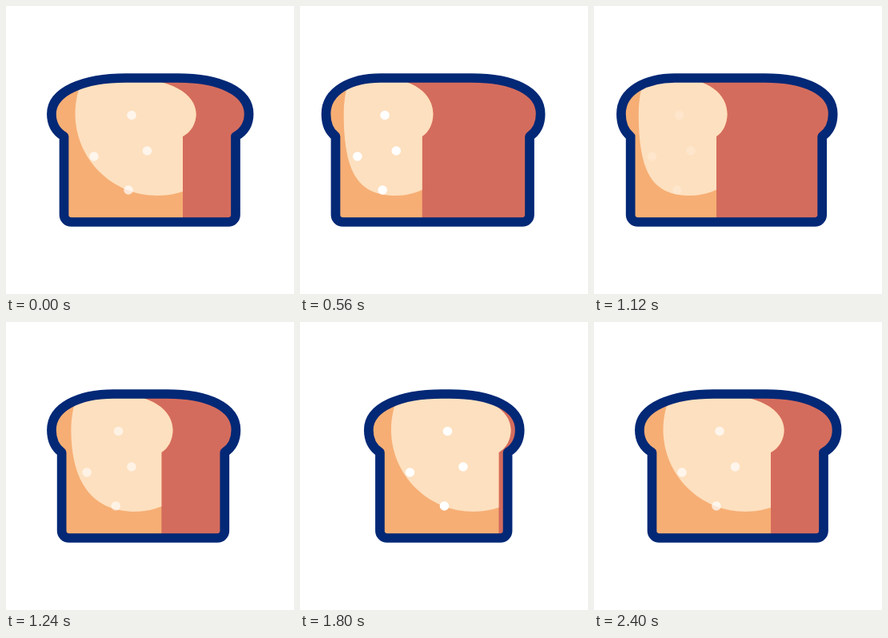
These frames come from a looping animation (360 px wide and 360 px high, 2.6 s). An HTML page:

```html
<!DOCTYPE html>
<html lang="en">
<head>
<meta charset="utf-8">
<title>Bread loaf</title>
<style>
  html, body { margin: 0; width: 100%; height: 100%; overflow: hidden; background: #fff; }
  svg { display: block; width: 100%; height: 100%; }
</style>
</head>
<body>
<svg viewBox="0 0 360 360">
  <defs>
    <clipPath id="loafClip"><path class="loaf"/></clipPath>
    <clipPath id="faceClip"><path class="face"/></clipPath>
  </defs>
  <path class="loaf" fill="#d46c5d"/>
  <g clip-path="url(#loafClip)">
    <path class="face" fill="#f6ae74"/>
    <g clip-path="url(#faceClip)"><path id="glow" fill="#fde0bf"/></g>
  </g>
  <g id="dots" fill="#fff"></g>
  <path class="loaf" fill="none" stroke="#022876" stroke-width="11.7" stroke-linejoin="round"/>
</svg>
<script>
const LOOP = 2600, STEP = 40, SLICE_LEFT = 102.5;

// left, right: body edges; lobeL, lobeR: overhang of the top crust;
// squash: horizontal scale of the front face; lowest, bulge: shape of the light area
const angled = { left: 72.5, right: 287, lobeL: 15.6, lobeR: 16.6, squash: 1, lowest: 219, bulge: 0.552 };
const side = { left: 42, right: 287, lobeL: 11.6, lobeR: 13.4, squash: 0.705, lowest: 205, bulge: 0.74 };
const front = { left: 102.5, right: 257, lobeL: 14, lobeR: 15, squash: 1, lowest: 219, bulge: 0.552 };

const moves = [
  { start: 160, end: 710, from: angled, to: side },
  { start: 995, end: 1500, from: side, to: front },
  { start: 1600, end: 2320, from: front, to: angled }
];
const dotFade = [
  [0, 0.7], [240, 0.7], [360, 1], [680, 1], [840, 0.5], [1040, 0.5],
  [1120, 0.2], [1360, 1], [2280, 1], [2400, 0.7], [LOOP, 0.7]
];
const dotSpots = [[187, 136.5], [140, 188], [206.5, 181], [183, 230]];

const glow = document.getElementById('glow');
const dotGroup = document.getElementById('dots');
const dots = dotSpots.map(([, y]) => {
  const dot = document.createElementNS('http://www.w3.org/2000/svg', 'circle');
  dot.setAttribute('cy', y);
  dot.setAttribute('r', 5.8);
  return dotGroup.appendChild(dot);
});

const mix = (a, b, p) => a + (b - a) * p;
const ease = t => t < 0.5 ? 4 * t ** 3 : 1 - 4 * (1 - t) ** 3;
const setPath = (selector, d) =>
  document.querySelectorAll(selector).forEach(path => path.setAttribute('d', d));

function poseAt(time) {
  const move = moves.filter(m => m.start <= time).pop() || moves[0];
  const t = (time - move.start) / (move.end - move.start);
  const p = ease(Math.min(1, Math.max(0, t)));
  const pose = {};
  for (const key in move.from) pose[key] = mix(move.from[key], move.to[key], p);
  return pose;
}

function fadeAt(time) {
  const i = dotFade.findIndex(([at]) => at > time);
  const [t0, a] = dotFade[i - 1], [t1, b] = dotFade[i];
  return mix(a, b, (time - t0) / (t1 - t0));
}

function loafPath({ left, right, lobeL, lobeR, squash }) {
  const outL = left - lobeL, outR = right + lobeR;
  const neckL = mix(left, outL, 0.65), neckR = mix(right, outR, 0.65);
  const topL = left + 77 * squash, topR = right - 72;
  return `M${left} 163C${neckL} 157 ${outL} 147 ${outL} 135` +
    `C${outL} 106 ${topL - 51 * squash} 90 ${topL} 90H${topR}` +
    `C${topR + 51} 90 ${outR} 106 ${outR} 135` +
    `C${outR} 147 ${neckR} 157 ${right} 163` +
    `V261a9 9 0 0 1-9 9H${left + 9}a9 9 0 0 1-9-9Z`;
}

function facePath({ left, lobeR }, faceX) {
  const edge = faceX(251), out = edge + lobeR;
  return `M${left - 40} 80H${faceX(180)}V90C${faceX(236)} 90 ${out} 110 ${out} 135` +
    `C${out} 147 ${mix(edge, out, 0.6)} 158 ${edge} 163V280H${left - 40}Z`;
}

function glowPath({ lowest, bulge }, faceX) {
  const low = faceX(lowest), rim = faceX(116.5), far = faceX(321.5);
  return `M${rim} 134.5C${rim} ${mix(134.5, 237, bulge)} ${mix(low, rim, bulge)} 237 ${low} 237` +
    `C${faceX(275.6)} 237 ${far} 191 ${far} 134.5` +
    `C${far} 78 ${faceX(275.6)} 32 ${faceX(219)} 32` +
    `C${faceX(162.4)} 32 ${rim} 78 ${rim} 134.5Z`;
}

function draw() {
  const time = Math.floor(performance.now() % LOOP / STEP) * STEP;
  const pose = poseAt(time);
  const faceX = x => pose.left + (x - SLICE_LEFT) * pose.squash;
  setPath('.loaf', loafPath(pose));
  setPath('.face', facePath(pose, faceX));
  setPath('#glow', glowPath(pose, faceX));
  dots.forEach((dot, i) => dot.setAttribute('cx', faceX(dotSpots[i][0])));
  dotGroup.setAttribute('opacity', fadeAt(time));
  requestAnimationFrame(draw);
}
draw();
</script>
</body>
</html>
```
